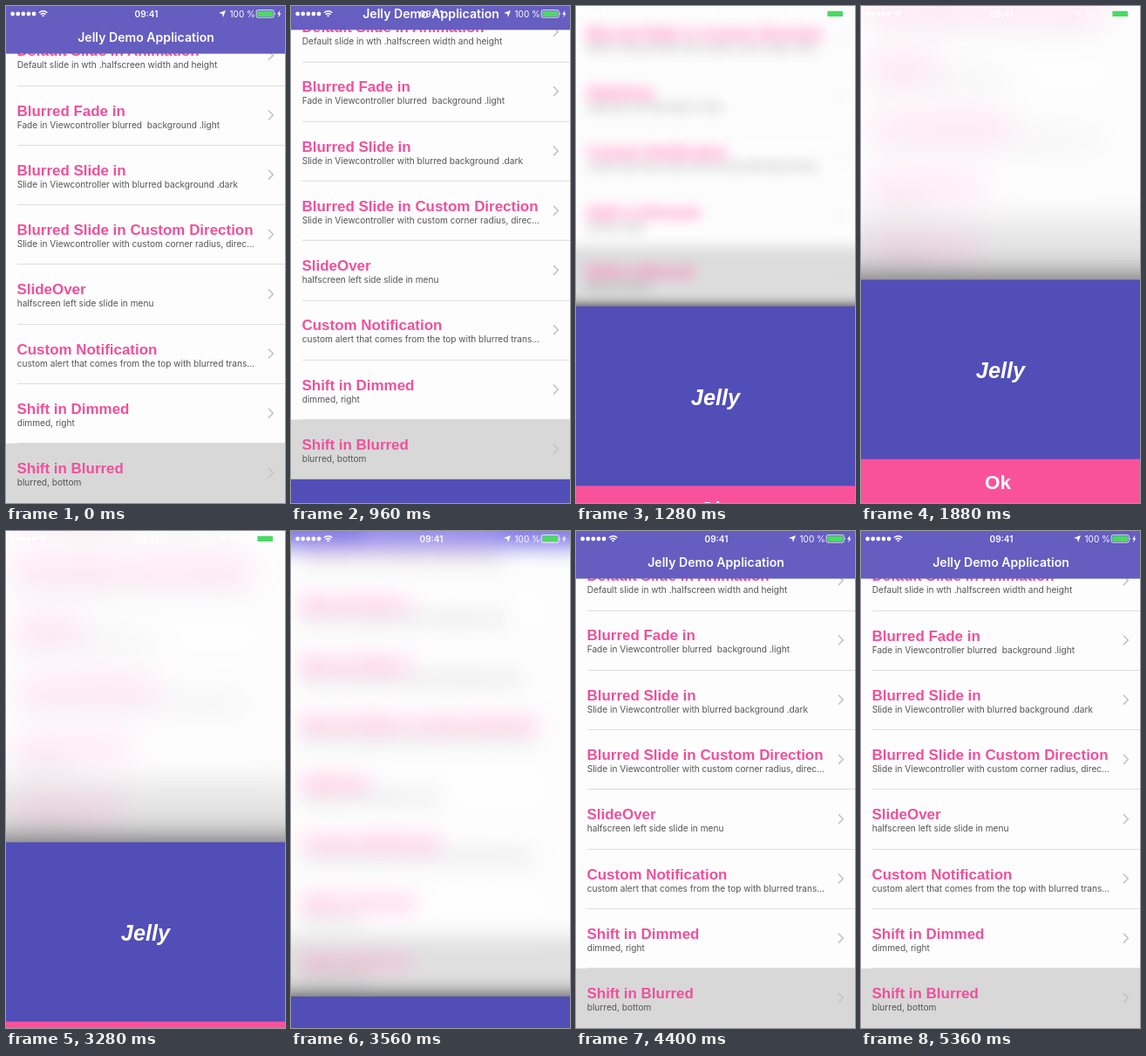
Animation of 320 by 569 pixels, one loop 5.4 s. Source, as an HTML page:

```html
<!DOCTYPE html>
<html lang="en">
<head>
<meta charset="utf-8">
<title>Jelly Demo Application</title>
<style>
  html, body { margin: 0; width: 100%; height: 100%; overflow: hidden; background: #000; }
  #stage { position: absolute; left: 0; top: 0; width: 320px; height: 569px; overflow: hidden; }
  svg, #tint { position: absolute; left: 0; top: 0; }
  #page { left: -60px; top: -60px; }
  #tint { width: 320px; height: 569px; background: #fff; opacity: 0; }
  text { white-space: pre; }
  .title { font: bold 16.95px "Liberation Sans", Arial, sans-serif; fill: #f0509b; }
  .sub { font: 10.12px Inter, Roboto, sans-serif; fill: #555; }
  .nav { font: 600 14.1px Inter, Roboto, sans-serif; fill: #fff; text-anchor: middle; }
  .bar { font: 10px Inter, Roboto, sans-serif; fill: #fff; }
  .clock { font-weight: 600; text-anchor: middle; }
  .big { font: italic bold 25.3px "Liberation Sans", Arial, sans-serif; fill: #fff; text-anchor: middle; }
  .ok { font: bold 22.5px "Liberation Sans", Arial, sans-serif; fill: #fff; text-anchor: middle; }
  .chevron { fill: none; stroke: #c4c4c9; stroke-width: 1.6; }
</style>
</head>
<body>
<div id="stage">
  <!-- The page runs past the stage so that its blur has no bare edges. -->
  <svg id="page" width="440" height="689" viewBox="-60 -60 440 689">
    <rect x="-60" y="-60" width="440" height="629" fill="#fdfdfd"/>
    <rect x="-60" y="569" width="440" height="60" fill="#000"/>
    <g id="rows"></g>
    <rect x="-60" y="-60" width="440" height="114.6" fill="#655dc0"/>
    <text class="nav" x="160.5" y="41">Jelly Demo Application</text>
  </svg>
  <div id="tint"></div>
  <svg id="panel" width="320" height="256" viewBox="0 0 320 256">
    <rect width="320" height="256" fill="#514eb8"/>
    <rect y="205.5" width="320" height="51" fill="#f9529b"/>
    <text class="big" x="160" y="113.2">Jelly</text>
    <text class="ok" x="157" y="239.5">Ok</text>
  </svg>
  <svg id="status" width="320" height="20" viewBox="0 0 320 20">
    <g id="dots" fill="#fff"></g>
    <g fill="none" stroke="#fff" stroke-width="1.4">
      <path d="M37.9 7.7a6.6 6.6 0 0 1 9.4 0"/>
      <path d="M39.7 9.7a4.1 4.1 0 0 1 5.8 0"/>
    </g>
    <path d="M42.6 12.6l-1.6-1.7a2.3 2.3 0 0 1 3.2 0z" fill="#fff"/>
    <text class="bar clock" x="161" y="12.8">09:41</text>
    <path d="M252 5l-3 8-.9-4.1-4.1-.9z" fill="#fff"/>
    <text class="bar" x="256.5" y="12.8">100 %</text>
    <rect x="287.2" y="4.6" width="20" height="8.6" rx="1.6" fill="none" stroke="#fff" stroke-width=".8"/>
    <rect x="288.4" y="5.7" width="17.6" height="6.4" rx=".6" fill="#4cd964"/>
    <path d="M308.2 7.3q1.5 1.6 0 3.2z" fill="#fff"/>
    <path d="M314.4 4.8l-3.4 4.6h2.1l-1 3.9 3.5-4.9h-2.1z" fill="#fff"/>
  </svg>
</div>
<script>
const LOOP = 5400, STEP = 40;
const TRAVEL = 256, RATE = 9.69 / 1000;
const OPEN = 903, CLOSE = 3204, FADE = 900;
const MAX_BLUR = 19, MAX_TINT = 0.3, EXTRA_COLOR = 0.6;
const HELD = [1000, 3320];          // steps that repeat the picture before them
const ROW = 68.27, BOTTOM = 569;

const items = [
  ["Default Slide in Animation", "Default slide in wth .halfscreen width and height"],
  ["Blurred Fade in", "Fade in Viewcontroller blurred  background .light"],
  ["Blurred Slide in", "Slide in Viewcontroller with blurred background .dark"],
  ["Blurred Slide in Custom Direction", "Slide in Viewcontroller with custom corner radius, direc…"],
  ["SlideOver", "halfscreen left side slide in menu"],
  ["Custom Notification", "custom alert that comes from the top with blurred trans…"],
  ["Shift in Dimmed", "dimmed, right"],
  ["Shift in Blurred", "blurred, bottom"]
];

const $ = id => document.getElementById(id);

$("rows").innerHTML = items.map(([title, sub], i) => {
  const top = BOTTOM - ROW * (items.length - i);
  const selected = i === items.length - 1;
  const back = selected
    ? `<rect x="-60" y="${top}" width="440" height="${ROW}" fill="#d8d8d8"/>`
    : `<rect x="13" y="${Math.round(top + ROW - 0.5)}" width="367" height="1" fill="#dddde0"/>`;
  return back +
    `<text class="title" x="12.5" y="${top + 34.4}">${title}</text>` +
    `<text class="sub" x="12.7" y="${top + 48.4}">${sub}</text>` +
    `<path class="chevron" d="M301 ${top + 28.4}l5.3 5.4-5.3 5.4"/>`;
}).join("");

$("dots").innerHTML = [0, 1, 2, 3, 4]
  .map(i => `<circle cx="${7.6 + i * 6.1}" cy="9" r="2.4"/>`).join("");

// Critically damped spring from 0 to 1.
function spring(ms) {
  const x = Math.max(0, ms) * RATE;
  return 1 - (1 + x) * Math.exp(-x);
}

function smooth(x) {
  x = Math.min(1, Math.max(0, x));
  return x * x * (3 - 2 * x);
}

function draw(now) {
  let t = Math.floor((now % LOOP) / STEP) * STEP;
  if (HELD.includes(t)) t -= STEP;

  const shift = TRAVEL * (t < CLOSE ? spring(t - OPEN) : 1 - spring(t - CLOSE));
  const haze = smooth((t - OPEN) / FADE) - smooth((t - CLOSE) / FADE);
  const blur = MAX_BLUR * haze;

  $("page").style.transform = `translateY(${-shift}px)`;
  $("page").style.filter = blur > 0.3
    ? `blur(${blur}px) saturate(${1 + EXTRA_COLOR * haze})`
    : "none";
  $("tint").style.opacity = MAX_TINT * haze;
  $("panel").style.transform = `translateY(${BOTTOM - shift}px)`;
}

const start = performance.now();
function tick() {
  draw(performance.now() - start);
  requestAnimationFrame(tick);
}
tick();
</script>
</body>
</html>
```
